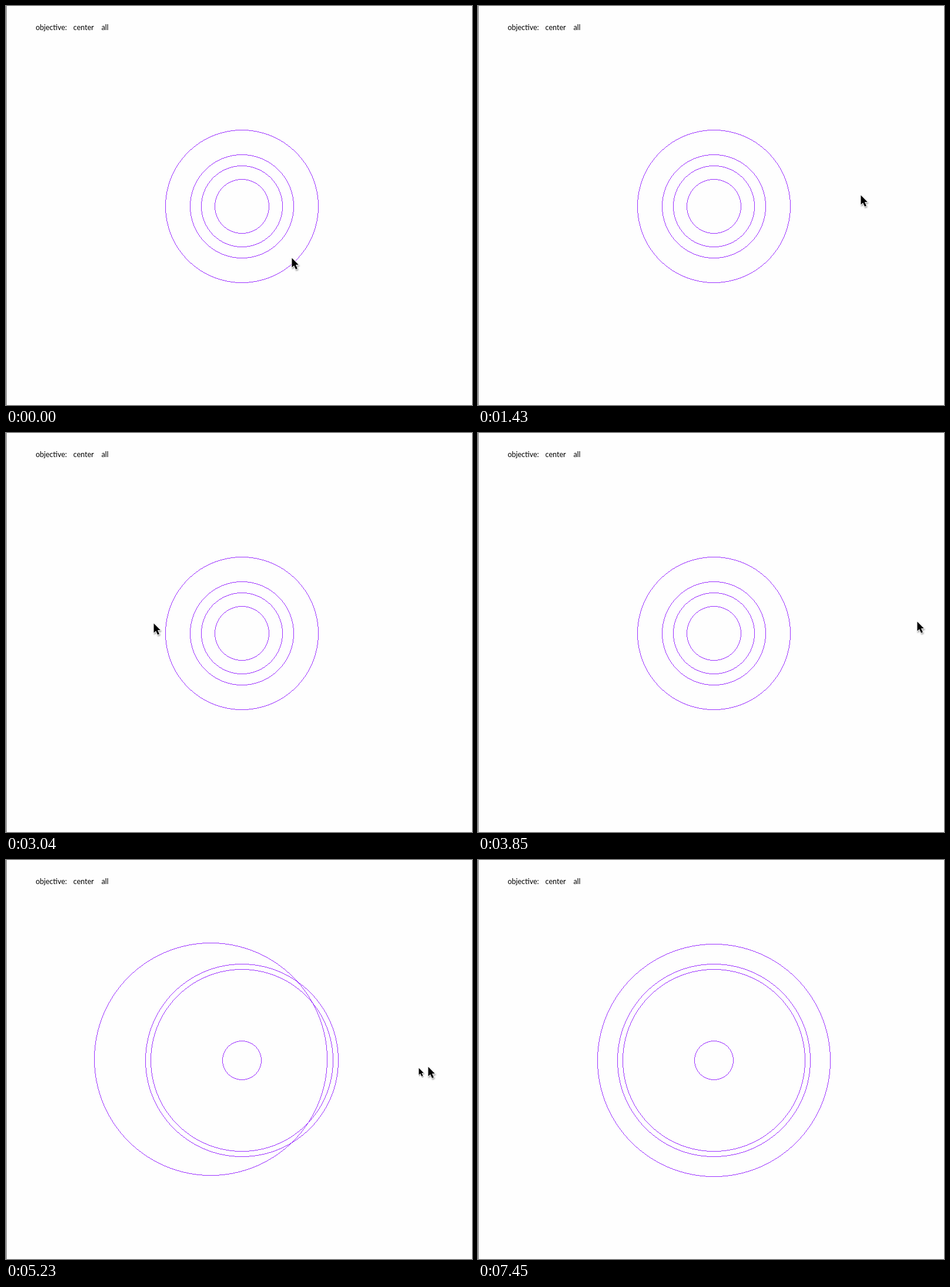
These frames come from a looping animation (793 by 680 pixels, 7.7 s). An HTML page with a canvas:

```html
<!DOCTYPE html>
<html lang="en">
<head>
<meta charset="utf-8">
<title>Center all</title>
<style>
  html, body { margin: 0; width: 100%; height: 100%; overflow: hidden; background: #fefefe; }
  canvas, svg { position: absolute; left: 0; top: 0; width: 793px; height: 680px; }
  text { font: 12.5px Lato, sans-serif; fill: #000; }
  .arrow { fill: #000; stroke: #fff; stroke-width: 1.8; paint-order: stroke; stroke-linejoin: round; }
  .cursor { filter: drop-shadow(1px 2px 1px rgba(0, 0, 0, .35)); }
</style>
</head>
<body>
<canvas id="stage" width="793" height="680"></canvas>
<svg viewBox="0 0 793 680">
  <defs>
    <path id="arrow" class="arrow" d="M0 0V16L3.6 12.7L6.6 19.2L9.4 18L6.5 11.6H11.3Z"/>
  </defs>
  <rect width="1" height="680" fill="#686868"/>
  <text y="41"><tspan x="50.4">objective:</tspan><tspan x="114.6">center</tspan><tspan x="162.4">all</tspan></text>
  <use id="small" class="cursor" href="#arrow" transform="translate(702.5 354.5) scale(.74)"/>
  <use id="cursor" class="cursor" href="#arrow"/>
</svg>
<script>
const LOOP = 7700, SWITCH = 4250, CX = 401, CY = 341;
const PUSH_START = 4700, PUSH_END = 5760;
const levels = [[130, 88, 69, 46], [198, 164, 155, 33]];

// Turning points of the pointer: time, x, y.
const path = [
  [0, 486, 429], [320, 486, 429], [640, 800, 290], [1060, 800, 310],
  [2110, 379, 343], [2730, 61, 325], [3850, 747, 321], [4080, 800, 340],
  [4600, 800, 365], [5230, 719, 352], [5820, 61, 525], [6340, 381, 338],
  [7150, 800, 690], [LOOP, 800, 690]
];

const $ = id => document.getElementById(id);
const ctx = $("stage").getContext("2d");
ctx.fillStyle = "#9b30ff";

// One-pixel circle without smoothing, mirrored from one octant.
function ring(cx, cy, r) {
  for (let a = 0; a <= r * Math.SQRT1_2 + 0.5; a++) {
    const b = Math.round(Math.sqrt(r * r - a * a));
    for (const [x, y] of [[a, b], [b, a]])
      for (const sx of [-1, 1])
        for (const sy of [-1, 1]) ctx.fillRect(cx + sx * x, cy + sy * y, 1, 1);
  }
}

function pointerAt(t) {
  const i = path.findIndex(p => p[0] > t);
  const [t0, x0, y0] = path[i - 1], [t1, x1, y1] = path[i];
  const k = (t - t0) / (t1 - t0);
  return [x0 + (x1 - x0) * k, y0 + (y1 - y0) * k].map(Math.round);
}

// The outer ring is pushed away from the pointer, then settles back.
function pushAt(t) {
  const k = (t - PUSH_START) / (PUSH_END - PUSH_START);
  return k > 0 && k < 1 ? Math.sin(Math.PI * k) / 6 : 0;
}

function draw(t) {
  const [x, y] = pointerAt(t), push = pushAt(t);
  ctx.clearRect(0, 0, 793, 680);
  levels[t < SWITCH ? 0 : 1].forEach((r, i) => {
    const k = i ? 0 : push;
    ring(CX - Math.round((x - CX) * k), CY - Math.round((y - CY) * k), r);
  });
  $("cursor").setAttribute("transform", `translate(${x + 0.5} ${y + 0.5})`);
  $("small").setAttribute("visibility", t >= 5230 && t < 5290 ? "visible" : "hidden");
}

const start = performance.now();
function tick() {
  draw((performance.now() - start) % LOOP);
  requestAnimationFrame(tick);
}
tick();
</script>
</body>
</html>
```
